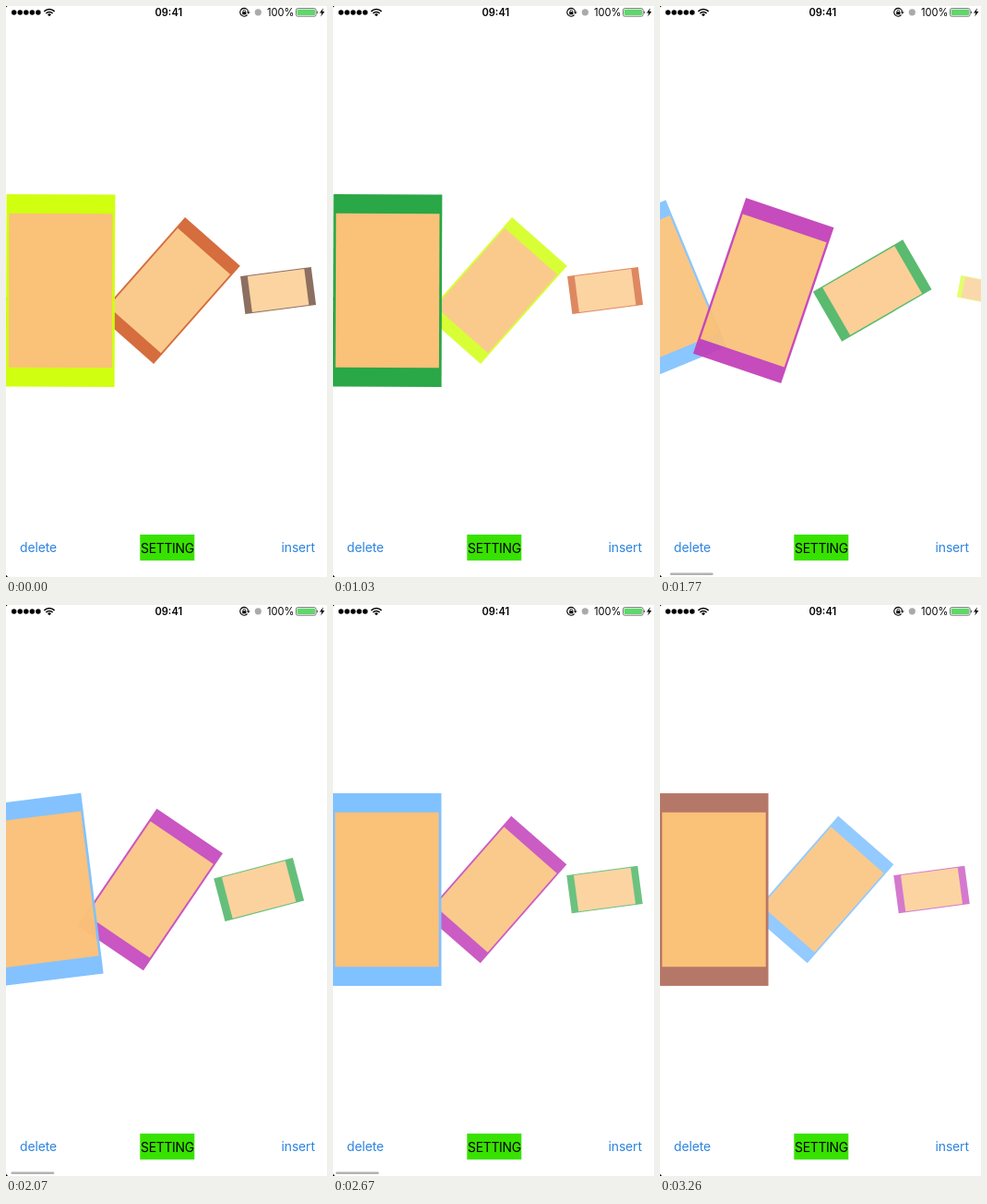
An HTML page that plays this animation: 348x619 px, repeating every 3410 ms.

```html
<!DOCTYPE html>
<html lang="en">
<head>
<meta charset="utf-8">
<title>Card carousel</title>
<style>
  html, body { margin: 0; width: 100%; height: 100%; overflow: hidden; background: #fff; }
  svg { display: block; width: 100%; height: 100%; }
  text { font-family: Inter, Roboto, "Liberation Sans", sans-serif; }
  .button { font-size: 13.9px; text-anchor: middle; letter-spacing: -.13px; }
  .link { fill: #2c84de; }
  .status { font-size: 11.1px; }
</style>
</head>
<body>
<svg viewBox="0 0 348 619">
  <rect width="348" height="619" fill="#fff"/>
  <g id="cards"></g>

  <g id="dots"></g>
  <g fill="none" stroke="#000" stroke-width="1.5">
    <path d="M41.4 5.9a8 8 0 0 1 11.2 0M43.4 8a5.1 5.1 0 0 1 7.2 0"/>
    <path d="M45 9.2a2.9 2.9 0 0 1 4 0L47 11.2z" fill="#000" stroke="none"/>
  </g>
  <text class="status" x="176.3" y="11" text-anchor="middle" font-weight="600">09:41</text>
  <g fill="none" stroke="#000">
    <path d="M261.6 9.6A4.4 4.4 0 1 1 262.6 6.6" stroke-width="1.1"/>
    <path d="M261 6.4h3.6l-1.8 2.4z" fill="#000" stroke="none"/>
    <path d="M257 6.6V5.6a1.3 1.3 0 0 1 2.6 0v1" stroke-width=".8"/>
    <rect x="256.2" y="6.3" width="4.2" height="3" fill="#000" stroke="none"/>
  </g>
  <circle cx="273.3" cy="6.8" r="3.6" fill="#aaa"/>
  <text class="status" x="297.8" y="11" text-anchor="middle">100%</text>
  <rect x="314.5" y="2.6" width="21.6" height="8.6" rx="1.8" fill="#fff" stroke="#555" stroke-width=".8"/>
  <rect x="315.6" y="3.7" width="19.4" height="6.4" rx=".8" fill="#5fd76b"/>
  <path d="M336.9 5.3a1.7 1.7 0 0 1 0 3.2z" fill="#555"/>
  <path d="M344 2.2L340 7.6h2.4L341.2 11.6 345.4 6.1h-2.5z"/>

  <text class="button link" x="35" y="592.3">delete</text>
  <rect x="145.3" y="573" width="59" height="28.2" fill="#38e200"/>
  <text class="button" x="174.9" y="592.5" style="letter-spacing:-.28px">SETTING</text>
  <text class="button link" id="insert" x="316.7" y="592.3">insert</text>
  <rect id="scrollbar" y="614.5" width="46.8" height="2.4" rx="1.2" fill="#b2b2b2"/>
  <path d="M0 0h1.6L0 1.6zM0 619v-2.2L2 619z"/>
</svg>
<script>
const LOOP = 3410;
const INSERTS = [692, 2790];
const SVG = "http://www.w3.org/2000/svg";
const layer = document.getElementById("cards");
const insertLabel = document.getElementById("insert");
const scrollbar = document.getElementById("scrollbar");

const clamp = x => Math.max(0, Math.min(1, x));
const smooth = x => { x = clamp(x); return x * x * (3 - 2 * x); };

function add(parent, tag, attrs = {}) {
  const el = document.createElementNS(SVG, tag);
  for (const key in attrs) el.setAttribute(key, attrs[key]);
  return parent.appendChild(el);
}

for (let i = 0; i < 5; i++)
  add(document.getElementById("dots"), "circle", { cx: 8.7 + 6.55 * i, cy: 7, r: 2.75 });

// slot: place before scrolling; a, b: state of the two insertions
const cards = [
  { color: "#80c1ff", slot: (s, a, b) => s - 2 + b },
  { color: "#c23eb9", slot: (s, a, b) => s - 1 + b },
  { color: "#2aa746", slot: (s, a, b) => s + b, fade: a => a },
  { color: "#d1ff10", slot: (s, a, b) => s + a + b },
  { color: "#ce531b", slot: (s, a, b) => s + 1 + a + b },
  { color: "#5a301a", slot: (s, a, b) => s + 2 + a + b },
  { color: "#b57768", slot: () => 0, fade: (a, b) => b }
];
for (const card of cards) {
  card.el = add(layer, "g");
  add(card.el, "rect", { x: -59, y: -104.4, width: 118, height: 208.8, fill: card.color });
  add(card.el, "rect", { x: -56.2, y: -83.7, width: 112.4, height: 167.4, fill: "#fac179" });
}

// The screen refreshes in steps of 150 ms, a few of them 10 ms shorter
const steps = Array.from({ length: 23 }, (_, i) =>
  150 * i - 10 * [1, 5, 9, 21].filter(k => i >= k).length);

// Flick, then slow down to rest two cards further
function scrollAt(t) {
  if (t < 1420) return .005;
  if (t < 1620) return .005 + 1.185 * ((t - 1420) / 200) ** 2;
  return 2 - .545 * (Math.max(0, 2455 - t) / 685) ** 2;
}

function placeCard(card, scroll, a, b) {
  const p = card.p = card.slot(scroll, a, b);
  const d = Math.abs(p);
  const sx = Math.max(0, 1 - .322 * d - .001 * d * d);
  const sy = Math.max(0, 1 - .325 * d + .0055 * d * d);
  const fade = card.fade ? card.fade(a, b) : 1;
  card.el.setAttribute("transform",
    `translate(${58.5 + 118 * p} 308.5) rotate(${41.2 * p}) scale(${sx} ${sy})`);
  card.el.setAttribute("opacity", Math.max(0, 1 - .155 * d) * fade);
  card.el.setAttribute("visibility", d > 3 || fade === 0 ? "hidden" : "visible");
}

function draw(t) {
  const scroll = scrollAt(t);
  const [a, b] = INSERTS.map(start => smooth((t - start) / 300));
  for (const card of cards) placeCard(card, scroll, a, b);
  [...cards].sort((m, n) => Math.abs(n.p) - Math.abs(m.p))
    .forEach(card => layer.appendChild(card.el));

  const tap = INSERTS.filter(start => t >= start).pop();
  insertLabel.setAttribute("opacity",
    tap === undefined ? 1 : .2 + .8 * clamp((t - tap - 30) / 280));

  scrollbar.setAttribute("x", 3 + 14.5 * (2 - scroll));
  scrollbar.setAttribute("visibility", t >= 1470 && t < 2820 ? "visible" : "hidden");
}

let origin, shown;
function tick(now) {
  origin ??= now;
  const t = (now - origin) % LOOP;
  const step = steps.filter(s => s <= t).pop();
  if (step !== shown) draw(shown = step);
  requestAnimationFrame(tick);
}
draw(0);
requestAnimationFrame(tick);
</script>
</body>
</html>
```
